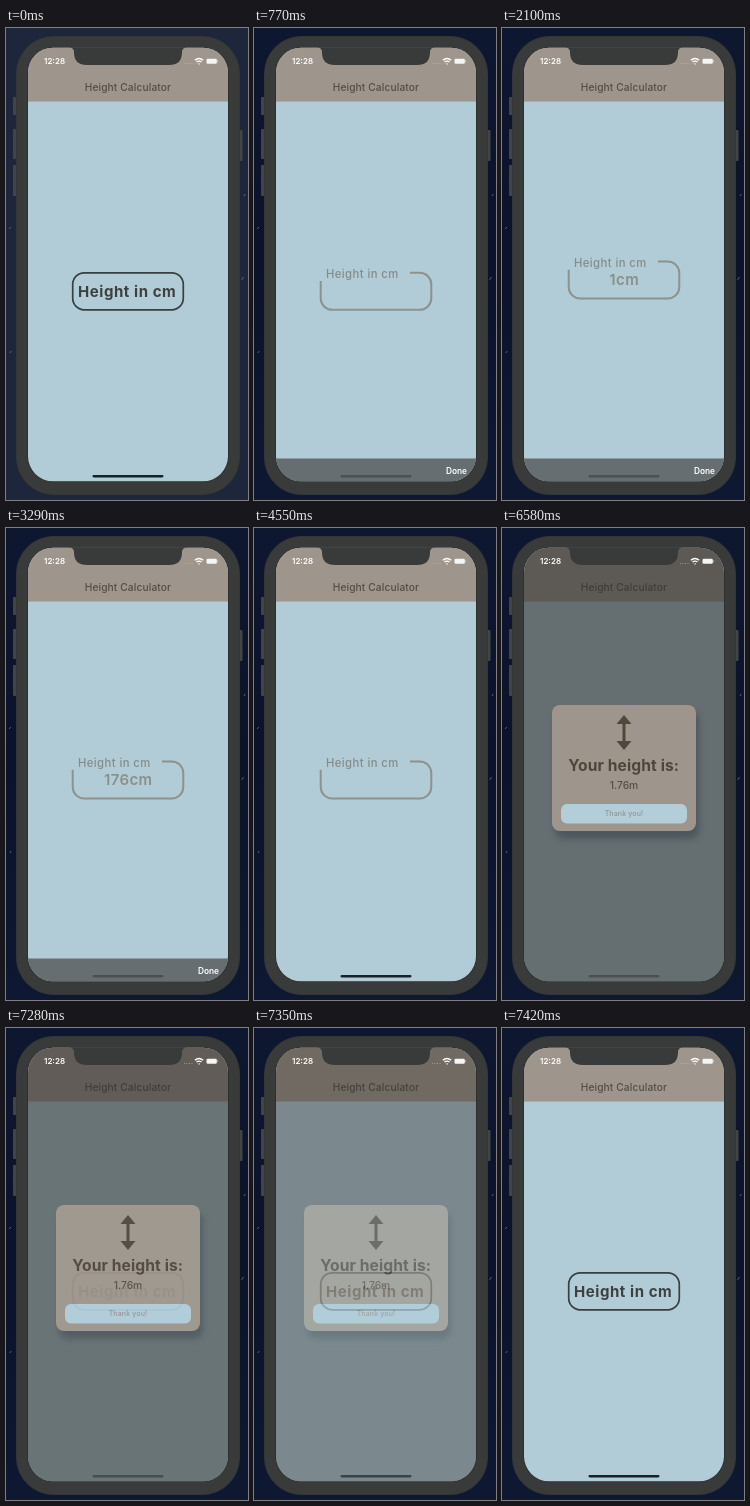
An HTML page for the animation above (7910 ms loop, 242x472 px).

```html
<!DOCTYPE html>
<html lang="en">
<head>
<meta charset="utf-8">
<title>Height Calculator</title>
<style>
  html, body { margin: 0; width: 100%; height: 100%; overflow: hidden; background: #0b142b; }
  svg { display: block; width: 242px; height: 472px; }
  text { font-family: Inter, "Liberation Sans", sans-serif; font-weight: 600; }
  .mid { text-anchor: middle; }
  .medium { font-weight: 500; }
  .bold { font-weight: 700; }
</style>
</head>
<body>
<svg viewBox="0 0 242 472" xmlns="http://www.w3.org/2000/svg">
  <defs>
    <linearGradient id="night" x1="0" y1="0" x2="0" y2="1">
      <stop offset="0" stop-color="#0e1730"/>
      <stop offset="0.5" stop-color="#0a1329"/>
      <stop offset="1" stop-color="#0e1832"/>
    </linearGradient>
    <clipPath id="screen"><rect x="22" y="19.700" width="200" height="433.600" rx="25"/></clipPath>
    <filter id="soft" x="-20%" y="-20%" width="140%" height="150%"><feGaussianBlur stdDeviation="3"/></filter>
  </defs>

  <rect width="242" height="472" fill="url(#night)"/>
  <rect id="haze" width="242" height="472" fill="#1d263b"/>
  <path d="M3 201l2 -2M235.500 252l2 -3M4 325l1 -2M238 168l1 -2" stroke="#8d95a8" stroke-width="0.800" opacity="0.700"/>

  <g fill="#434544">
    <rect x="7" y="69" width="5" height="18" rx="1"/>
    <rect x="7" y="101" width="5" height="30" rx="1"/>
    <rect x="7" y="137" width="5" height="31" rx="1"/>
    <rect x="232" y="102" width="4.500" height="31" rx="1"/>
  </g>
  <rect x="10.500" y="8.500" width="223" height="458" rx="37" fill="#393b3a" stroke="#353736"/>
  <rect x="21.300" y="19" width="201.400" height="435" rx="25.700" fill="#2b2e2d"/>

  <g clip-path="url(#screen)">
    <rect x="22" y="18" width="200" height="437" fill="#b1ccd6"/>
    <rect x="22" y="18" width="200" height="55.500" fill="#9e968c"/>
    <text class="mid medium" x="121.900" y="62.500" font-size="10.200" letter-spacing="0.120" fill="#544d45">Height Calculator</text>

    <g id="field">
      <path id="outline" fill="none"/>
      <text id="label" font-size="15" letter-spacing="0.570">Height in cm</text>
      <text id="value" class="mid" x="122.200" y="268" font-size="15" letter-spacing="0.400" fill="#899089"></text>
    </g>

    <g id="bar">
      <rect x="22" y="430.500" width="200" height="26" fill="#666e71"/>
      <text x="213" y="445.800" font-size="8.300" text-anchor="end" fill="#fff">Done</text>
    </g>

    <g id="dialog">
      <rect x="22" y="18" width="200" height="437" fill="#33312f" opacity="0.600"/>
      <rect x="53" y="184" width="144" height="127" rx="9" fill="#3f4b51" opacity="0.650" filter="url(#soft)"/>
      <rect x="50" y="177" width="144" height="126" rx="8" fill="#9e968c"/>
      <path d="M122 187l7.500 9h-6v17h6l-7.500 9l-7.500 -9h6v-17h-6z" fill="#51473b"/>
      <text class="mid bold" x="121.700" y="242.500" font-size="15.600" letter-spacing="0.100" fill="#4f463b">Your height is:</text>
      <text class="mid medium" x="122" y="261" font-size="10.300" fill="#574e43">1.76m</text>
      <rect x="59" y="276" width="126" height="19.500" rx="6" fill="#b1ced9"/>
      <text class="mid medium" x="122" y="288.300" font-size="7" letter-spacing="0.150" fill="#95938d">Thank you!</text>
    </g>
    <rect id="home" x="86.500" y="447.100" width="71" height="2.300" rx="1.150"/>
  </g>

  <path d="M63 19.200Q68 19.700 68 24V24.500Q68 37 81 37H163Q176 37 176 24.500V24Q176 19.700 181 19.200z" fill="#393b3a"/>

  <text x="38" y="36" font-size="8" fill="#fff">12:28</text>
  <g fill="#cfc9c3" opacity="0.600">
    <circle cx="178.500" cy="35.500" r="0.600"/><circle cx="181" cy="35.500" r="0.600"/>
    <circle cx="183.500" cy="35.500" r="0.600"/><circle cx="186" cy="35.500" r="0.600"/>
  </g>
  <g fill="none" stroke="#fff" stroke-width="1.300">
    <path d="M188.800 32.300q4.200 -3.600 8.400 0M190.500 34.100q2.500 -2 5 0"/>
    <path d="M192 35.500l0.900 0.900l0.900 -0.900" stroke-width="1"/>
  </g>
  <rect x="200.500" y="30.800" width="10.300" height="4.900" rx="1.300" fill="#f4f6f6"/>
  <rect x="211.300" y="32.300" width="0.800" height="1.900" fill="#fff" opacity="0.600"/>
</svg>

<script>
const LOOP = 7910, TICK = 70;
const $ = id => document.getElementById(id);
const [haze, outline, label, value, field, bar, dialog, home] =
  ["haze", "outline", "label", "value", "field", "bar", "dialog", "home"].map($);

const lerp = (a, b, p) => a + (b - a) * p;
const span = (t, a, b) => Math.min(1, Math.max(0, (t - a) / (b - a)));
const ease = p => p * p * (3 - 2 * p);
const mix = (a, b, p) => `rgb(${a.map((v, i) => Math.round(lerp(v, b[i], p)))})`;

// Rounded box whose top-left edge opens to make room for the label.
function boxPath(open) {
  const r = 11.5, left = 66.7, right = 177.3, top = 244.8, bottom = 281.8;
  const arc = (x, y) => `A${r} ${r} 0 0 1 ${x} ${y}`;
  const path = `M${lerp(left + r, 156, open)} ${top}H${right - r}${arc(right, top + r)}` +
    `V${bottom - r}${arc(right - r, bottom)}H${left + r}${arc(left, bottom - r)}`;
  return path + (open > 0 ? "V253" : `V${top + r}${arc(left + r, top)}Z`);
}

function typed(t) {
  if (t < 1610 || t >= 4340) return "";
  return (t < 2450 ? "1" : t < 3150 ? "17" : "176") + "cm";
}

function draw(t) {
  const active = t < 4760;
  const focus = active ? ease(span(t, 350, 700)) : 0;
  const lift = active ? ease(span(t, 910, 1260)) : 0;
  const barUp = ease(span(t, 350, 770)) * (1 - ease(span(t, 4270, 4550)));
  const shown = ease(span(t, 4550, 4760)) * (1 - span(t, 7070, 7420) ** 5.5);

  haze.setAttribute("opacity", 1 - span(t, 0, 280));
  field.setAttribute("transform", `translate(0 ${-11.3 * lift})`);
  outline.setAttribute("d", boxPath(focus));
  outline.setAttribute("stroke", mix([54, 64, 66], [140, 146, 142], focus));
  outline.setAttribute("stroke-width", lerp(1.7, 2, focus));
  label.setAttribute("transform",
    `translate(72 ${lerp(269, 250.2, focus)}) scale(${lerp(1, 0.75, focus)})`);
  label.setAttribute("fill", mix([62, 64, 63], [132, 139, 136], focus));
  label.style.fontWeight = lerp(650, 530, focus);
  value.textContent = typed(t);

  bar.setAttribute("transform", `translate(0 ${26 * (1 - barUp)})`);
  dialog.setAttribute("opacity", shown);
  home.setAttribute("fill", mix([22, 34, 38], [76, 80, 82], Math.max(barUp, shown)));
}

const begin = performance.now();
function frame() {
  const t = (performance.now() - begin) % LOOP;
  draw(Math.floor(t / TICK) * TICK);
  requestAnimationFrame(frame);
}
draw(0);
requestAnimationFrame(frame);
</script>
</body>
</html>
```
